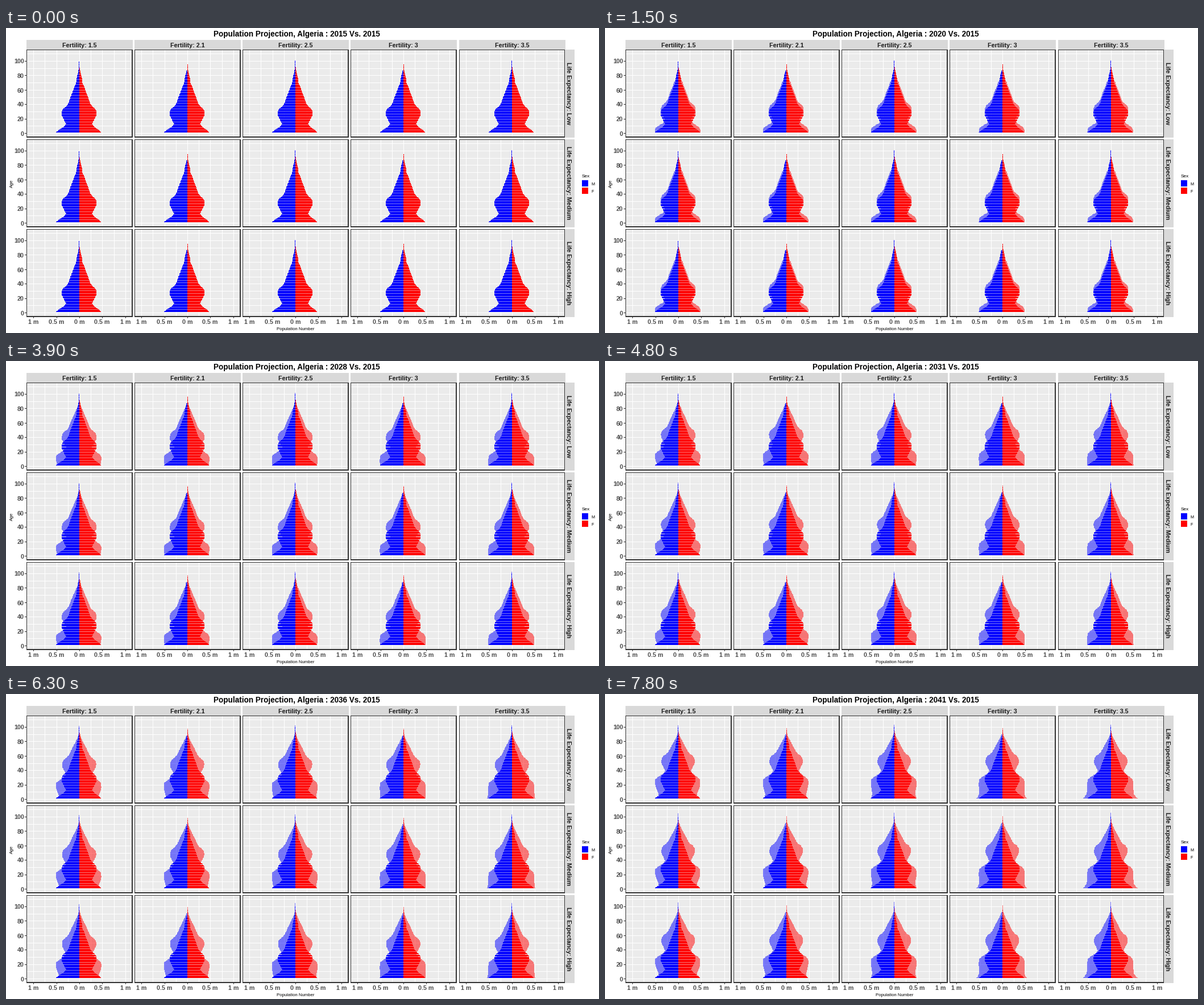
Recreate the animation shown at these times as a matplotlib script. Size 1043 by 537 pixels, loop 8000 ms.

```python
import numpy as np
import matplotlib.pyplot as plt
from matplotlib.animation import FuncAnimation
from matplotlib.collections import PolyCollection

W, H, DPI = 1043, 537, 64
TICK_MS, LOOP_MS, YEAR_MS = 100, 8000, 300
FIRST_YEAR = 2015

FERTILITY = ["1.5", "2.1", "2.5", "3", "3.5"]
EXPECTANCY = ["Low", "Medium", "High"]
CENTERS = [int(129 + 190.25 * i) for i in range(5)]   # x of zero population
TOPS = [38, 196, 354]                                 # top edge per row
HALF_W, PANEL_H, ZERO_Y = 93, 154, 147
PX_YEAR, PX_HALF_M = 1.27, 40.4

BIRTH_MIX = [0, 0.3, 0.5, 0.75, 1]
HAZARD = [2.2e-4, 1.9e-4, 1.6e-4]
OLDEST = [99, 95, 100, 95, 100]
OLDEST_GAIN = [3, 5, 6]

plt.rcParams["font.family"] = "Liberation Sans"
fig = plt.figure(figsize=(W / DPI, H / DPI), dpi=DPI, facecolor="white")
ax = fig.add_axes([0, 0, 1, 1])
ax.set_xlim(0, W)
ax.set_ylim(H, 0)
ax.axis("off")


def box(x0, y0, x1, y1):
    return [(x0, y0), (x1, y0), (x1, y1), (x0, y1)]


def fill(polys, color, z, alpha=None):
    shapes = PolyCollection(polys, facecolors=color, edgecolors="none", linewidths=0,
                            antialiaseds=False, alpha=alpha, zorder=z)
    ax.add_collection(shapes, autolim=False)
    return shapes


def label(x, y, s, px, color="black", ha="center", bold=True, rotation=0):
    return ax.text(x, y, s, fontsize=px * 72 / DPI, color=color, ha=ha, va="baseline",
                   weight="bold" if bold else "normal", rotation=rotation,
                   rotation_mode="anchor", zorder=9)


# ---- population model, widths in pixels ----
AGE_KNOTS = [0, 1, 4, 6, 8, 10, 13, 16, 20, 24, 28, 31, 34, 37, 40, 45,
             50, 55, 60, 65, 68, 70, 75, 80, 84, 90, 100]
MEN_KNOTS = [41, 41, 37, 33, 28.5, 26, 23.3, 25.5, 28, 30.7, 31, 30.3, 28, 23, 20, 17.5,
             15.5, 13, 10.5, 8.5, 6.5, 5.5, 5, 3.5, 2, 1, 0.4]
BIRTH_YEARS = [0, 5, 9, 13, 19, 23, 26]
BIRTHS_LOW = [41, 41, 40, 38, 35, 34, 34]
BIRTHS_HIGH = [41, 42, 42, 42, 43, 46.5, 51]


def start_pop(age, female):
    men = np.interp(age, AGE_KNOTS, MEN_KNOTS)
    return men * np.interp(age, [0, 13, 28], [0.93, 0.95, 0.98]) if female else men


def births(t, col, female):
    low = np.interp(t, BIRTH_YEARS, BIRTHS_LOW)
    high = np.interp(t, BIRTH_YEARS, BIRTHS_HIGH)
    return (low + BIRTH_MIX[col] * (high - low)) * (0.94 if female else 1)


def widths(t, row, col, female):
    last = OLDEST[col] + round(OLDEST_GAIN[row] * (t / 26) ** 2)
    if female == (col % 2 == 0):
        last -= 9
    age = np.arange(1, last + 1)
    born = age - t
    since = np.maximum(born, 0)
    w = np.where(born >= 0, start_pop(since, female),
                 births(np.maximum(-born, 0), col, female))
    w = w * np.exp(-HAZARD[row] * (np.exp(0.1 * age) - np.exp(0.1 * since)))
    return age, np.maximum(np.rint(w), 1)


def edge(row, age):
    return np.rint(TOPS[row] + ZERO_Y - PX_YEAR * np.asarray(age))


def thin_bars(row, col, female):
    # one pixel per age, so the pitch leaves regular gaps
    x, sign = CENTERS[col], 1 if female else -1
    age, w = widths(0, row, col, female)
    return [box(x, y - 1, x + sign * v, y) for y, v in zip(edge(row, age - 0.5), w)]


def outline(t, row, col, female):
    x, sign = CENTERS[col], 1 if female else -1
    age, w = widths(t, row, col, female)
    ys = np.column_stack([edge(row, age - 0.5), edge(row, age + 0.5)]).ravel()
    xs = x + sign * np.repeat(w, 2)
    return np.vstack([(x, ys[0]), np.column_stack([xs, ys]), (x, ys[-1])])


# ---- panels ----
PANELS = [(r, c) for r in range(3) for c in range(5)]
backs, strips, grid, borders, ticks = [], [], [], [], []
for r, c in PANELS:
    x, y0 = CENTERS[c], TOPS[r]
    x0, x1, y1 = x - HALF_W, x + HALF_W, y0 + PANEL_H
    backs.append(box(x0, y0, x1, y1))
    for k in range(-4, 5):
        gx = round(x + k * PX_HALF_M / 2)
        grid.append(box(gx, y0, gx + 1, y1))
    for a in range(0, 111, 10):
        gy = edge(r, a)
        grid.append(box(x0, gy, x1, gy + 1))
    borders += [box(x0, y0, x0 + 1, y1), box(x0, y0, x1, y0 + 1),
                box(x1 - 1, y0, x1 + 1, y1 + 1), box(x0, y1 - 1, x1 + 1, y1 + 1)]

GRAY = "#4D4D4D"
for x, f in zip(CENTERS, FERTILITY):
    strips.append(box(x - HALF_W, 21, x + HALF_W + 1, 38))
    label(x, 34.5, "Fertility: " + f, 10.7, "#1A1A1A")
    for k, s in zip(range(-2, 3), ["1 m", "0.5 m", "0 m", "0.5 m", "1 m"]):
        tx = round(x + k * PX_HALF_M)
        ticks.append(box(tx, 509, tx + 1, 511))
        label(tx, 521, s, 10.6, GRAY)

for r, (y, e) in enumerate(zip(TOPS, EXPECTANCY)):
    strips.append(box(983, y, 1000, y + PANEL_H + 1))
    label(986, y + 77, "Life Expectancy: " + e, 10.7, "#1A1A1A", rotation=-90)
    for a in range(0, 101, 20):
        ty = edge(r, a)
        ticks.append(box(33, ty, 36, ty + 1))
        label(32, ty + 4.5, str(a), 10.7, GRAY, ha="right")

fill(backs, "#EBEBEB", 1)
fill(grid, "white", 2)
fill(borders, "#333333", 6)
fill(ticks, "#333333", 6)
fill(strips, "#D9D9D9", 7)

# ---- pyramids ----
COLORS = {False: "#0000FF", True: "#FF0000"}
current = {}
for sex, color in COLORS.items():
    fill([b for r, c in PANELS for b in thin_bars(r, c, sex)], color, 3)
    current[sex] = fill([outline(0, r, c, sex) for r, c in PANELS], color, 4, alpha=0.5)

# ---- titles and legend ----
title = label(511.5, 15, "", 13.5)
label(509, 532, "Population Number", 7.7, bold=False)
label(12, 273.5, "Age", 8, bold=False, rotation=90)
label(1012.5, 263, "Sex", 8.2, ha="left", bold=False)
for y, s, sex in [(268, "M", False), (281, "F", True)]:
    fill([box(1013, y, 1024, y + 11)], COLORS[sex], 5)
    label(1029.5, y + 9, s, 7.2, ha="left", bold=False)


def update(n):
    t = n * TICK_MS // YEAR_MS
    title.set_text(f"Population Projection, Algeria : {FIRST_YEAR + t} Vs. {FIRST_YEAR}")
    for sex, shapes in current.items():
        shapes.set_verts([outline(t, r, c, sex) for r, c in PANELS])
    return [title, *current.values()]


anim = FuncAnimation(fig, update, frames=LOOP_MS // TICK_MS, interval=TICK_MS,
                     repeat=True, repeat_delay=0, blit=False)
plt.show()
```
